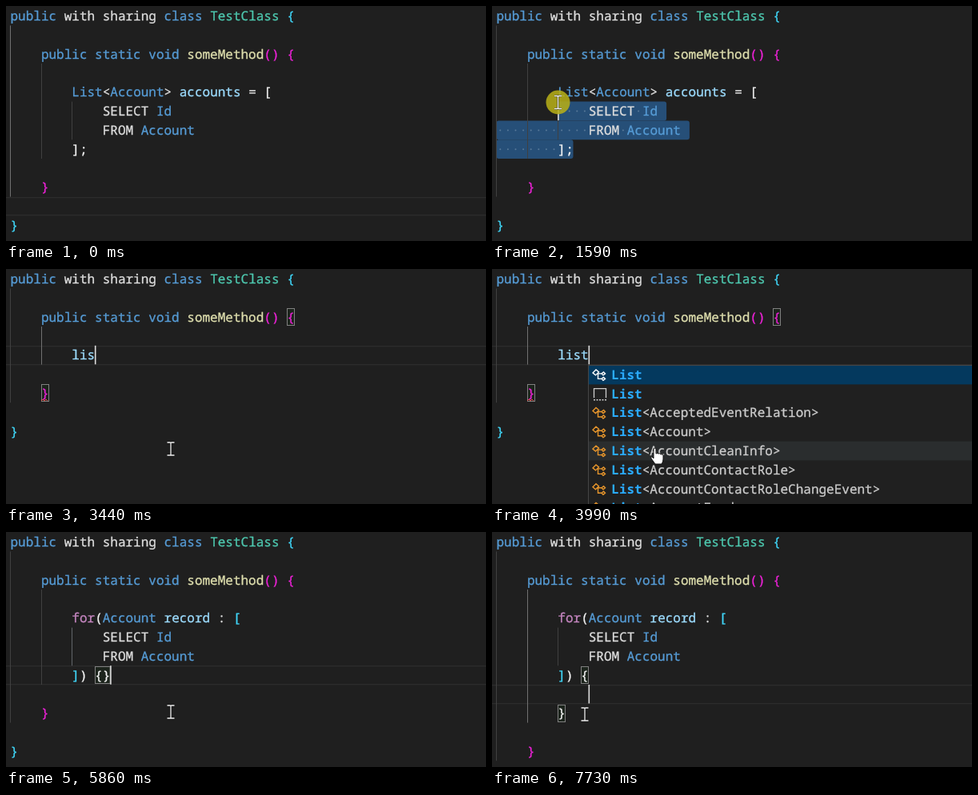
Animation of 600 by 294 pixels, one loop 8 s. Source, as an HTML page:

```html
<!DOCTYPE html>
<html>
<head>
<meta charset="utf-8">
<style>
  html, body { margin: 0; width: 100%; height: 100%; overflow: hidden; background: #1f1f1f; }
  svg { display: block; width: 600px; height: 294px; }
  text { font: 16px "Noto Sans Mono", "DejaVu Sans Mono", monospace; white-space: pre; text-rendering: geometricPrecision; stroke-width: .3px; }
</style>
</head>
<body>
<svg id="stage" viewBox="0 0 600 294"></svg>
<script>
const stage = document.getElementById('stage');
const LEFT = 5.5, CHAR = 9.6, LINE = 23.8, LOOP = 8000;
const colX = c => LEFT + c * CHAR;
const lineY = n => 0.6 + n * LINE;

// "~x" switches the text colour
const COLORS = {
  w: '#dedede', b: '#569cd6', t: '#4ec9b0', y: '#dfdfae', v: '#9cdcfe',
  p: '#c586c0', c: '#40d8fa', m: '#ee22d8', f: '#f4f4f4', l: '#2aaaff', g: '#cccccc'
};
const HEAD = ['~bpublic ~wwith sharing ~bclass ~tTestClass ~c{', '',
  '    ~bpublic static void ~ysomeMethod~m() {', ''];
const QUERY = ['            ~wSELECT ~bId', '            ~wFROM ~bAccount'];
const TAIL = ['', '    ~m}', '', '~c}'];
const LOOP_HEAD = '        ~pfor~f(~bAccount ~vrecord ~w: ~c[';
const DOCS = {
  list: [...HEAD, '        ~bList~w<~bAccount~w> ~vaccounts ~w= ~f[', ...QUERY, '        ~f];', ...TAIL],
  loop: [...HEAD, LOOP_HEAD, ...QUERY, '        ~c]~f) {}', ...TAIL],
  body: [...HEAD, LOOP_HEAD, ...QUERY, '        ~c]~f) {', '', '        ~f}', ...TAIL]
};
const typed = word => [...HEAD, '        ~v' + word, ...TAIL];
const plain = s => s.replace(/~./g, '');

const esc = s => s.replace(/&/g, '&amp;').replace(/</g, '&lt;');
const rect = (x, y, w, h, fill, more = '') =>
  `<rect x="${x}" y="${y}" width="${w}" height="${h}" fill="${fill}" ${more}/>`;
const path = (d, more) => `<path d="${d}" ${more}/>`;

function span(part) {
  const key = part[0], color = COLORS[key];
  const weight = key === 'l' ? 'font-weight="700"' : `stroke="${color}"`;
  return `<tspan fill="${color}" ${weight}>${esc(part.slice(1))}</tspan>`;
}

function text(s, x, y) {
  const [indent, ...parts] = s.split('~');
  return `<text x="${x}" y="${y}">${indent}${parts.map(span).join('')}</text>`;
}

// guide: [column, first line, last line, colour]
const guide = ([col, from, to, color = '#404040']) =>
  rect(Math.round(colX(col)) - (col ? 0 : 1), lineY(from), 1, (to - from + 1) * LINE, color);

const lineBox = n =>
  rect(0, Math.round(lineY(n)), 600, 1.3, '#2c2c2c') + rect(0, Math.round(lineY(n + 1)) - 1, 600, 1.3, '#2c2c2c');

const bracket = ([line, col, count = 1]) =>
  rect(Math.round(colX(col)) + .5, Math.round(lineY(line)) + 1.5, count * CHAR - .6, 21, '#1c241c', 'stroke="#808080"');

const caret = ([line, col]) => rect(colX(col) - .2, lineY(line), 1.6, 23.5, '#dcdcdc');

function selection(doc, line0, col0) {
  let out = '';
  for (let n = line0; n <= 7; n++) {
    const s = plain(doc[n]), from = n === line0 ? col0 : 0;
    const w = (s.length - from) * CHAR + (n < 7 ? 11 : 0);
    out += rect(colX(from), lineY(n), w, LINE, '#264f78', 'rx="3"');
    for (let c = from; c < s.length; c++)
      if (s[c] === ' ') out += `<circle cx="${colX(c + .5)}" cy="${lineY(n) + 12}" r="1" fill="#587a9a"/>`;
  }
  return out;
}

const bulb = path('M15.500 97.500a6 6 0 0 0-6 6c0 3 3 4.500 3 7h6c0-2.500 3-4 3-7a6 6 0 0 0-6-6zM12.500 111.500h6v1.500l-1.500 1h-3l-1.500-1z', 'fill="#fc0"')
  + rect(14.7, 105, 1.6, 5, '#1f1f1f');

const ITEMS = ['', '', 'AcceptedEventRelation', 'Account', 'AccountCleanInfo',
  'AccountContactRole', 'AccountContactRoleChangeEvent', 'AccountFeed'];

function classIcon(y, color) {
  return `<g transform="translate(125 ${y - 8})" fill="none" stroke="${color}" stroke-width="1.4">`
    + path('M1 5.500L5 1.500L8.500 4.500L4.500 8.500zM6.500 6.500H12M7.500 6.500V13H12M12 6.500L14.500 4.500L16.500 6.500L14 8.500zM12 13L14.500 11L16.500 13L14 15z', '') + '</g>';
}

function snippetIcon(y) {
  return path(`M127.500 ${y + 5}V${y - 6.500}H142.500V${y + 5}`, 'fill="none" stroke="#ccc" stroke-width="1.3"')
    + path(`M127 ${y + 7.500}H143`, 'stroke="#ccc" stroke-width="1.5" stroke-dasharray="2 1.500"');
}

function popup() {
  let out = rect(120.5, 120.5, 490, 190, '#202020', 'stroke="#454545"');
  ITEMS.forEach((name, i) => {
    const y = 120.4 + i * LINE;
    if (i === 0) out += rect(121, 121, 479, 23.4, '#04395e');
    if (i === 4) out += rect(121, y, 479, LINE, '#2a2d2e');
    out += i === 1 ? snippetIcon(y + 12) : classIcon(y + 12, i ? '#e8962c' : '#fff');
    out += text('~lList' + (name && `~g<${name}>`), 149.3, y + 17.4);
  });
  return out;
}

function pointer({ at: [x, y], press, hand }) {
  if (hand)
    return path(`M${x - 4} ${y}q2-2 3 0v6q2-1 3 0q2-1 3 1q3-1 3 1v5q0 3-2 6h-8l-5-7q-1-3 1-2l2 2z`,
      'fill="#fff" stroke="#111" stroke-width="1"');
  const beam = `M${x - 4.5} ${y - 8}h3.500q1 0 1 1q0-1 1-1h3.500M${x} ${y - 7}v14M${x - 4.5} ${y + 8}h3.500q1 0 1-1q0 1 1 1h3.500`;
  return (press ? `<circle cx="${x}" cy="${y}" r="15" fill="#b5ad18" opacity=".88"/>` : '')
    + path(beam, 'fill="none" stroke="#111" stroke-width="3" opacity=".5"')
    + path(beam, 'fill="none" stroke="#eee" stroke-width="1.3"');
}

const GUIDES = [[0, 1, 9], [4, 3, 7], [8, 5, 6]];
const start = { doc: DOCS.list, guides: [[0, 1, 9, '#707070'], ...GUIDES.slice(1)], row: 10 };
const drag = { doc: DOCS.list, guides: GUIDES };
const whole = { ...drag, sel: [4, 8] };
const typing = word => ({
  doc: typed(word), guides: [[0, 1, 6], [4, 3, 4, '#707070']], row: 4,
  boxes: [[2, 36], [6, 4]], caret: [4, 8 + word.length], squiggle: true, at: [206, 225]
});
const suggest = { ...typing('list'), popup: true, hand: true };
const loop = {
  doc: DOCS.loop, guides: [...GUIDES.slice(0, 2), [8, 5, 6, '#606468']], row: 7,
  boxes: [[7, 11, 2]], at: [206, 225]
};
const loopOn = { ...loop, caret: [7, 13] };
const body = {
  doc: DOCS.body, guides: [[0, 1, 11], [4, 3, 9, '#707070'], [8, 5, 6]], row: 8,
  boxes: [[7, 11], [9, 8]], at: [206, 225]
};
const bodyOn = { ...body, caret: [8, 12] };

const SCENES = [
  [0, start],
  [260, { ...start, at: [378, 283] }],
  [520, { ...start, at: [250, 228] }],
  [780, { ...start, at: [140, 188] }],
  [1040, { ...start, at: [103, 180] }],
  [1310, { ...drag, sel: [6, 9], at: [91, 153], press: true }],
  [1590, { ...drag, sel: [5, 8], caret: [5, 8], at: [82.5, 120.5], press: true }],
  [1850, { ...whole, at: [82.5, 109], press: true }],
  [2120, { ...whole, at: [86, 113] }],
  [2390, { ...whole, bulb: true, at: [150, 170] }],
  [2650, { ...whole, bulb: true, at: [206, 219] }],
  [2910, typing('')],
  [3180, typing('l')],
  [3440, typing('lis')],
  [3720, suggest],
  [4520, loopOn],
  [5310, loop],
  [5860, loopOn],
  [6390, loop],
  [6660, bodyOn],
  [7190, body],
  [7470, { ...body, at: [165, 234] }],
  [7730, { ...bodyOn, at: [116, 228] }]
];

function draw(s) {
  return rect(0, 0, 600, 294, '#1f1f1f')
    + (s.row ? lineBox(s.row) : '')
    + (s.sel ? selection(s.doc, ...s.sel) : '')
    + s.guides.map(guide).join('')
    + (s.boxes || []).map(bracket).join('')
    + s.doc.map((line, n) => text(line, LEFT, lineY(n) + 17.6)).join('')
    + (s.squiggle ? path('M44 165l2-2l2 2l2-2l2 2', 'fill="none" stroke="#e04848"') : '')
    + (s.caret ? caret(s.caret) : '')
    + (s.bulb ? bulb : '')
    + (s.popup ? popup() : '')
    + (s.at ? pointer(s) : '');
}

let shown;
function tick() {
  const t = performance.now() % LOOP;
  const scene = SCENES.findLast(([from]) => from <= t)[1];
  if (scene !== shown) stage.innerHTML = draw(shown = scene);
  requestAnimationFrame(tick);
}
tick();
</script>
</body>
</html>
```
